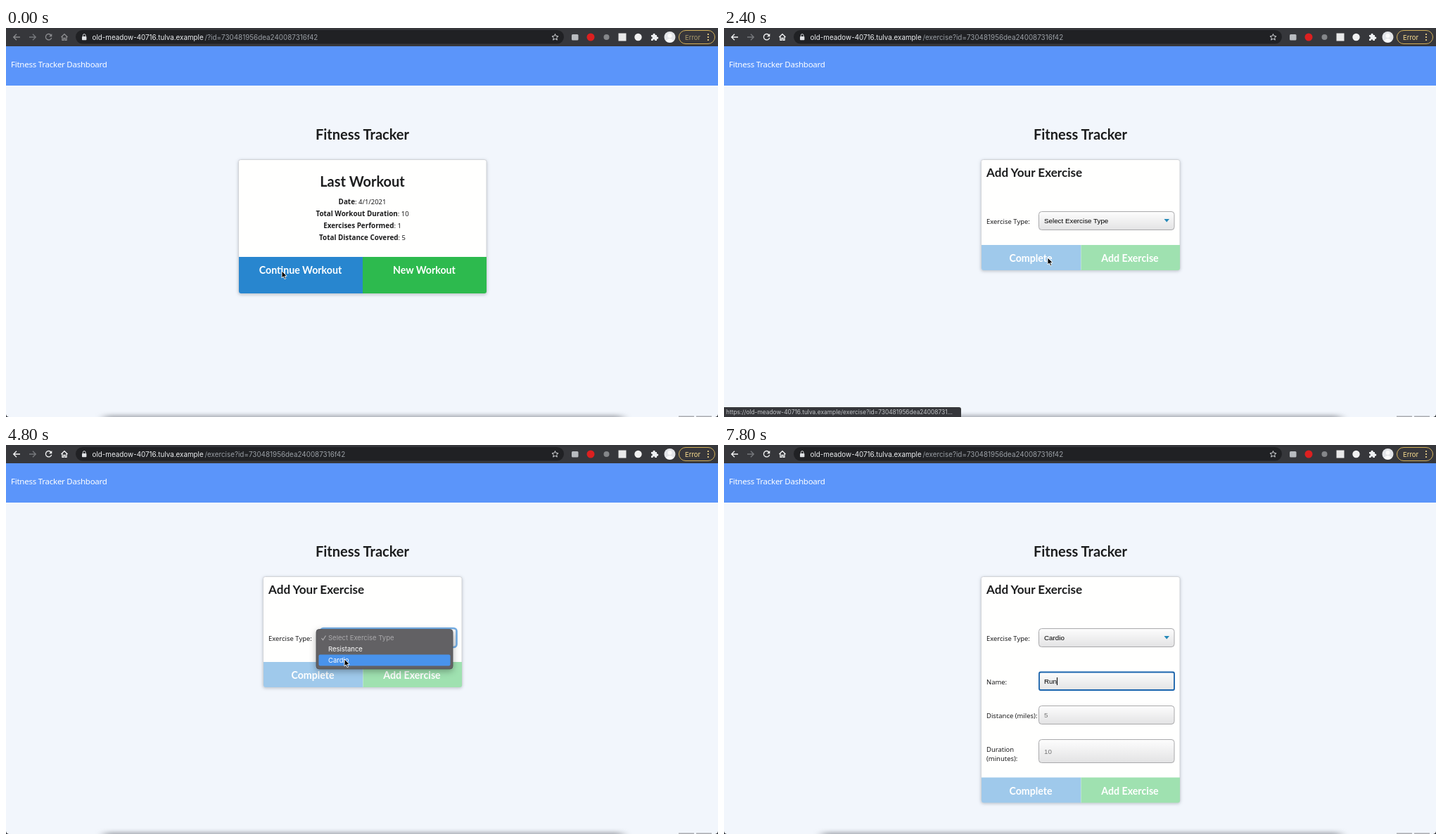
An HTML page for the animation above (8 s loop, 1012 by 554 pixels).

```html
<!DOCTYPE html>
<html lang="en">
<head>
<meta charset="utf-8">
<title>Fitness Tracker</title>
<style>
html, body { margin: 0; width: 100%; height: 100%; overflow: hidden; background: #f2f6fc; }
svg { display: block; }

.ui { font-family: Inter, sans-serif; font-size: 9.5px; }
.url { font-size: 9.85px; }
.body { font-family: "Noto Sans", sans-serif; font-size: 9.45px; fill: #1c1c1d; }
.body b, .bold { font-weight: 700; font-size: 9.9px; }
.head { font-family: Lato, sans-serif; font-weight: 700; fill: #1c1d1e; }
.mid { text-anchor: middle; }
.h1 { font-size: 20px; }
.h2 { font-size: 17.1px; }
.btn { font-size: 14.2px; fill: #fff; }
.field text { font: 9.8px "Liberation Sans", Arial, sans-serif; }
.hint { fill: #757575; }
.box { fill: url(#soft); stroke: #a9a9ab; }
.card { fill: #fffffe; stroke: #d2d4d8; filter: drop-shadow(0 1px 2px rgba(40,50,65,.26)); }
.line { fill: none; stroke: currentColor; stroke-width: 1.3; }

/* Everything runs on one 8 s clock, in 200 ms ticks (2.5%). */
.t { animation: 8s step-end infinite; }
.off { opacity: 0; }

#nav { color: #8b8c8f; animation-name: wake; }
@keyframes wake { 10%, to { color: #f3f4f5; } }
#alert { fill: #a99a6c; animation-name: alert; }
@keyframes alert { 10%, to { fill: #fbdf92; } }
#go { fill: #2886cf; animation-name: hover; }
@keyframes hover { 10%, to { fill: #1c79c0; } }

.landing { animation-name: landing; }
@keyframes landing { 20%, to { opacity: 0; } }
.exercise { animation-name: exercise; }
@keyframes exercise { 20%, to { opacity: 1; } }
.short { animation-name: short; }
@keyframes short { 20% { opacity: 1; } 65%, to { opacity: 0; } }
.full { animation-name: full; }
@keyframes full { 65%, to { opacity: 1; } }
#status { animation-name: status; }
@keyframes status { 15% { opacity: 1; } 32.5% { opacity: 0; } }

#ring { animation-name: ring; }
@keyframes ring { 40% { opacity: 1; } 85% { opacity: 0; } }
#menu { animation-name: menu; }
@keyframes menu { 40% { opacity: 1; } 65% { opacity: 0; } }
#pick { animation-name: pick; }
@keyframes pick {
  52.5% { opacity: 1; transform: none; }
  57.5% { opacity: 1; transform: translateY(16px); }
  65% { opacity: 0; }
}

.focus { animation-name: focus; }
@keyframes focus { 85%, to { opacity: 1; } }
#sample { animation-name: sample; }
@keyframes sample { 92.5%, to { opacity: 0; } }
.key { fill-opacity: 0; }
.k1 { animation-name: k1; }
.k2 { animation-name: k2; }
.k3 { animation-name: k3; }
@keyframes k1 { 92.5%, to { fill-opacity: 1; } }
@keyframes k2 { 95%, to { fill-opacity: 1; } }
@keyframes k3 { 97.5%, to { fill-opacity: 1; } }
#caret { animation-name: caret; }
@keyframes caret {
  0% { transform: none; }
  92.5% { transform: translateX(7px); }
  95% { transform: translateX(12.5px); }
  97.5%, to { transform: translateX(18px); }
}

#mouse { animation: move 8s infinite; }
@keyframes move {
  0% { transform: translate(392px,346px); animation-timing-function: steps(4); }
  10% { transform: translate(440px,348px); animation-timing-function: step-end; }
  27.5% { transform: translate(440px,348px); animation-timing-function: steps(4); }
  37.5% { transform: translate(520px,264px); animation-timing-function: step-end; }
  45% { transform: translate(520px,264px); animation-timing-function: steps(6); }
  60% { transform: translate(481px,305px); animation-timing-function: steps(2); }
  65% { transform: translate(463px,297px); animation-timing-function: steps(6); }
  80%, to { transform: translate(476px,338px); }
}
#arrow { animation-name: arrow; }
@keyframes arrow { 10% { opacity: 0; } 27.5% { opacity: 1; } 75%, to { opacity: 0; } }
#hand { animation-name: hand; }
@keyframes hand { 10% { opacity: 1; } 27.5% { opacity: 0; } }
#beam { animation-name: beam; }
@keyframes beam { 75% { opacity: 1; } 92.5% { opacity: 0; } }
</style>
</head>
<body>
<svg width="1012" height="554" viewBox="0 0 1012 554">
  <defs>
    <linearGradient id="soft" x2="0" y2="1">
      <stop stop-color="#fdfdfd"/><stop offset="1" stop-color="#e3e3e4"/>
    </linearGradient>
    <filter id="blur" x="-10%" y="-300%" width="120%" height="700%"><feGaussianBlur stdDeviation="7 3"/></filter>
    <g id="actions">
      <path fill="#9fc9eb" d="M366 0h141.500v36h-138.500a3 3 0 0 1-3-3z"/>
      <path fill="#9fe1b0" d="M507.500 0h140.500v33a3 3 0 0 1-3 3h-137.500z"/>
      <text class="head btn mid" x="436" y="24">Complete</text>
      <text class="head btn mid" x="577" y="24">Add Exercise</text>
    </g>
  </defs>

  <rect width="1012" height="554" fill="#f2f6fc"/>
  <rect x="140" y="552" width="736" height="8" fill="#6c7078" opacity=".65" filter="url(#blur)"/>
  <path fill="#a9abb0" d="M956 552.500h22v1.500h-22zM981 552.500h22v1.500h-22z"/>
  <path fill="#33363c" d="M0 550q.5 3.500 4 4h-4zM1012 550q-.5 3.500-4 4h4z"/>

  <!-- Browser bar -->
  <g class="ui">
    <rect width="1012" height="26" fill="#36373b"/>
    <rect x="99" y="3" width="694" height="19.500" rx="9.750" fill="#202124"/>
    <g id="nav" class="t">
      <path class="line" d="M20 13h-9M15 8.700l-4.300 4.300l4.300 4.300"/>
      <path class="line" d="M64 10.200a4.200 4.200 0 1 0 .700 3.600"/>
      <path fill="currentColor" d="M65.300 8v4.300h-4.300z"/>
      <path class="line" d="M78.500 13l4.500-4.300l4.500 4.300M80 12.300v5h2v-3h2v3h2v-5"/>
    </g>
    <path class="line" color="#77797d" d="M33 13h9M38 8.700l4.300 4.300l-4.300 4.300"/>
    <rect x="108" y="12" width="6.400" height="5.200" rx=".8" fill="#dfe1e4"/>
    <path class="line" color="#dfe1e4" style="stroke-width:1" d="M109.400 12v-1.500a1.800 1.800 0 0 1 3.600 0v1.500"/>
    <text class="url" x="122.500" y="16.500" fill="#eceef0">old-meadow-40716.tulva.example</text>
    <text class="url t landing" x="282.500" y="16.500" fill="#9a9fa5">/?id=730481956dea240087316f42</text>
    <text class="url t off exercise" x="282.500" y="16.500" fill="#9a9fa5">/exercise?id=730481956dea240087316f42</text>
    <path class="line" color="#d7d9dc" style="stroke-width:1" d="M780.500 8.500l1.300 3l3.200.3l-2.400 2.100l.7 3.200l-2.800-1.700l-2.800 1.700l.7-3.200l-2.400-2.100l3.200-.3z"/>
    <rect x="804" y="9" width="9.500" height="8.500" rx="1.500" fill="#b9bcc0"/>
    <circle cx="831" cy="13" r="5.500" fill="#dc2020"/>
    <circle cx="853.500" cy="13" r="4" fill="#85878a"/>
    <rect x="870.500" y="7.500" width="11" height="11" fill="#e9e9e9"/>
    <circle cx="898.500" cy="13" r="5.200" fill="#f1f1f1"/>
    <path fill="#eef0f2" d="M917 10h2.500a1.700 1.700 0 1 1 3.200 0h2.300v2.500a1.700 1.700 0 1 1 0 3.200v2.300h-2.700a1.400 1.400 0 1 0-2.700 0h-2.600v-2.700a1.400 1.400 0 1 0 0-2.700z"/>
    <circle cx="943.500" cy="13" r="8" fill="#e3e5e9"/>
    <circle cx="943.500" cy="11" r="3" fill="#fafafa"/>
    <path fill="#fafafa" d="M938 18.500q5.500-7 11 0q-5.500 4-11 0z"/>
    <rect x="956.500" y="3.500" width="51" height="19" rx="9.500" fill="#37363a" stroke="#d3b15b"/>
    <g id="alert" class="t">
      <text x="965" y="16.500">Error</text>
    </g>
    <g fill="#fbdf92"><circle cx="998" cy="9" r="1.100"/><circle cx="998" cy="13" r="1.100"/><circle cx="998" cy="17" r="1.100"/></g>
  </g>

  <rect y="26" width="1012" height="56" fill="#5b95fa"/>
  <text class="body" x="7" y="55.500" style="font-size:11.5px;letter-spacing:-.25px;fill:#fff">Fitness Tracker Dashboard</text>
  <text class="head h1 mid" x="506.500" y="159">Fitness Tracker</text>

  <!-- Landing card -->
  <g class="t landing">
    <rect class="card" x="330.500" y="187.500" width="352.500" height="191" rx="3"/>
    <text class="head h1 mid" x="506.500" y="226">Last Workout</text>
    <g class="body mid">
      <text x="506.500" y="251"><tspan class="bold">Date</tspan>: 4/1/2021</text>
      <text x="506.500" y="268"><tspan class="bold">Total Workout Duration</tspan>: 10</text>
      <text x="506.500" y="285"><tspan class="bold">Exercises Performed</tspan>: 1</text>
      <text x="506.500" y="302"><tspan class="bold">Total Distance Covered</tspan>: 5</text>
    </g>
    <path id="go" class="t" d="M331 326h176v52h-173a3 3 0 0 1-3-3z"/>
    <path fill="#2dba4e" d="M507 326h176v49a3 3 0 0 1-3 3h-173z"/>
    <text class="head btn mid" x="418.500" y="349.500">Continue Workout</text>
    <text class="head btn mid" x="594.500" y="349.500">New Workout</text>
  </g>

  <!-- Exercise form -->
  <g class="t off short">
    <rect class="card" x="365.500" y="187.500" width="282.500" height="157.500" rx="3"/>
    <use href="#actions" y="309"/>
  </g>
  <g class="t off full">
    <rect class="card" x="365.500" y="187.500" width="282.500" height="322" rx="3"/>
    <use href="#actions" y="473.500"/>
    <g class="body">
      <text x="373" y="341">Name:</text>
      <text x="373" y="388.500">Distance (miles):</text>
      <text x="373" y="436.500">Duration</text>
      <text x="373" y="450">(minutes):</text>
    </g>
    <g class="field">
      <rect class="box" x="447.500" y="323.500" width="192.500" height="26" rx="4"/>
      <rect class="box" x="447.500" y="371.500" width="192.500" height="26" rx="4"/>
      <rect class="box" x="447.500" y="419.500" width="192.500" height="33" rx="4"/>
      <text id="sample" class="hint t" x="455" y="340">Running</text>
      <text class="hint" x="455" y="388">5</text>
      <text class="hint" x="455" y="439.500">10</text>
      <g class="t off focus">
        <rect x="448" y="323.500" width="192" height="25.500" rx="2" fill="none" stroke="#1b65ae" stroke-width="1.800"/>
        <rect id="caret" class="t" x="455" y="331" width="1" height="11"/>
      </g>
      <text x="455" y="340"><tspan class="t key k1">R</tspan><tspan class="t key k2">u</tspan><tspan class="t key k3">n</tspan></text>
    </g>
  </g>
  <g class="t off exercise">
    <text class="head h2" x="373" y="212">Add Your Exercise</text>
    <text class="body" x="373" y="279">Exercise Type:</text>
    <g class="field">
      <rect class="box" x="447.500" y="261.500" width="192.500" height="26" rx="4"/>
      <rect id="ring" class="t off" x="447" y="261" width="193.500" height="27" rx="4" fill="none" stroke="#74aee5" stroke-width="2.600"/>
      <text class="t off short" x="455" y="278">Select Exercise Type</text>
      <text class="t off full" x="455" y="278">Cardio</text>
      <path fill="#2388b8" d="M625.500 272h7.500l-3.750 4.500z"/>
    </g>
  </g>

  <!-- Drop-down list -->
  <g id="menu" class="t off ui">
    <rect x="441" y="262.500" width="194" height="56.500" rx="4" fill="#626164" stroke="#4f4f52" stroke-width=".8" style="filter:drop-shadow(0 3px 5px rgba(0,0,0,.3))"/>
    <rect id="pick" class="t off" x="444.500" y="282.500" width="187" height="16" rx="2" fill="#4993ec"/>
    <path class="line" color="#b0afb1" style="stroke-width:1.100" d="M448.500 275l2 2.700l4-6.200"/>
    <text x="458" y="278" fill="#aaa9ab">Select Exercise Type</text>
    <text x="458" y="294" fill="#fff">Resistance</text>
    <text x="458" y="310.200" fill="#fff">Cardio</text>
  </g>

  <g id="status" class="t off ui">
    <path fill="#36373b" d="M0 540h334a3 3 0 0 1 3 3v11h-337z"/>
    <text x="3" y="550" fill="#c3c5c8" style="font-size:8.4px">https://old-meadow-40716.tulva.example/exercise?id=730481956dea24008731...</text>
  </g>

  <g id="mouse">
    <path id="arrow" class="t" fill="#000" stroke="#fff" stroke-width=".9" d="M0 0v10l2.300-2.100l1.700 3.700l1.700-.7l-1.600-3.600h3.100z"/>
    <path id="hand" class="t off" fill="#fff" stroke="#111" stroke-width=".9" stroke-linejoin="round" d="M-1.200 1.200q1-1.500 2 0l.7 3.300q1-.8 1.700.3q1-.6 1.700.5q1.500-.4 1.800 1.200q.2 3-1.200 5.500h-5.200q-1.500-2.400-3.600-4.600q.4-1.700 3 .2z"/>
    <path id="beam" class="t off" fill="none" stroke="#222" d="M-2-5.500q2 0 2 1.500v8q0 1.500-2 1.500M2-5.500q-2 0-2 1.500M0 4q0 1.500 2 1.500"/>
  </g>
</svg>
</body>
</html>
```
